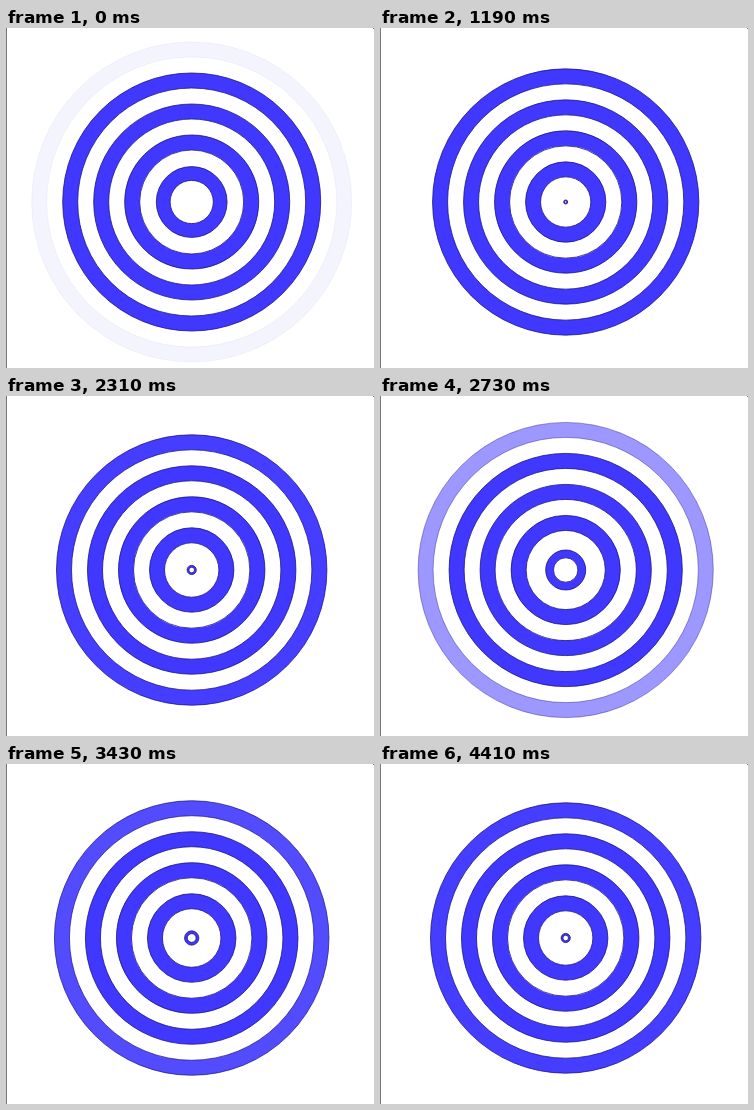
An HTML page with a canvas that plays this animation: 368 px wide and 340 px high, repeating every 4480 ms.

```html
<!DOCTYPE html>
<html lang="en">
<head>
<meta charset="utf-8">
<title>Ripples</title>
<style>
  html, body { margin: 0; width: 100%; height: 100%; overflow: hidden; background: #fff; }
  canvas { display: block; }
</style>
</head>
<body>
<canvas id="stage" width="368" height="340"></canvas>
<script>
const ctx = document.getElementById('stage').getContext('2d');
const LOOP = 4480, STEP = 70;
const CX = 185.7, CY = 174;
const GAP = 31;              // distance between neighbouring rings
const SPEED = GAP / 15;      // growth per step
const START = 28.5;          // radius of the youngest ring at time zero
const WIDTH = 15;
const FADE_END = 154, FADE = 27;

const clamp = v => Math.max(0, Math.min(1, v));

function circle(r, width, color) {
  ctx.beginPath();
  ctx.arc(CX, CY, Math.max(r, 0.3), 0, Math.PI * 2);
  ctx.lineWidth = width;
  ctx.strokeStyle = color;
  ctx.stroke();
}

function ring(r) {
  const w = WIDTH * clamp(r / GAP);
  ctx.globalAlpha = clamp((FADE_END - r) / FADE);
  circle(r, w, '#4038ff');
  circle(r + w / 2, 0.8, '#1c1682');
  circle(r - w / 2, 0.8, '#1c1682');
}

function border() {
  ctx.globalAlpha = 1;
  ctx.fillStyle = '#777';
  ctx.fillRect(0, 0, 1, 340);
  ctx.fillRect(367, 0, 1, 1);
}

function draw(ms) {
  const step = Math.floor((ms % LOOP) / STEP);
  const first = (START + step * SPEED) % GAP;
  ctx.globalAlpha = 1;
  ctx.fillStyle = '#fff';
  ctx.fillRect(0, 0, 368, 340);
  for (let r = first; r < FADE_END; r += GAP) ring(r);
  border();
}

const t0 = performance.now();
function tick() {
  draw(performance.now() - t0);
  requestAnimationFrame(tick);
}
tick();
</script>
</body>
</html>
```
